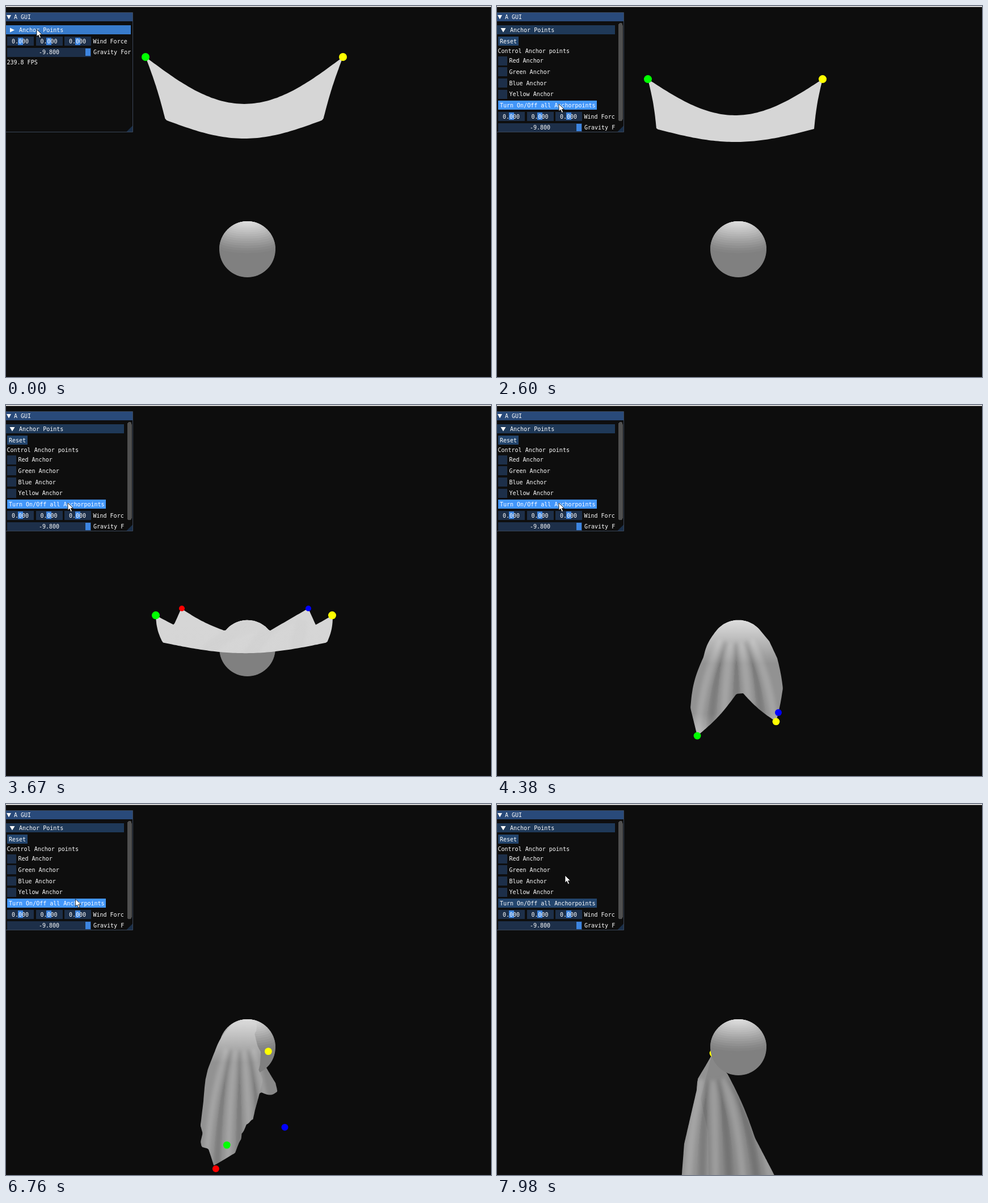
Write an HTML page that moves like this. It is 855 px wide and 655 px high and loops after 8000 ms.

```html
<!DOCTYPE html>
<html lang="en">
<head>
<meta charset="utf-8">
<title>Cloth simulation</title>
<style>
  html, body { margin: 0; width: 100%; height: 100%; overflow: hidden; background: #0d0d0d; }
  svg { display: block; width: 855px; height: 655px; }
  text { font: 10px "DejaVu Sans Mono", monospace; fill: #fff; white-space: pre; }
  #gui rect { shape-rendering: crispEdges; }
</style>
</head>
<body>
<svg id="stage" viewBox="0 0 855 655">
  <defs>
    <linearGradient id="tone" gradientUnits="userSpaceOnUse" x1="0" y1="379" x2="0" y2="600">
      <stop offset="0"/><stop offset=".35"/><stop offset=".75"/><stop offset="1"/>
    </linearGradient>
    <clipPath id="backClip"><path class="back"/></clipPath>
    <clipPath id="frontClip"><path class="front"/></clipPath>
    <clipPath id="ballClip"><circle cx="425.5" cy="429.5" r="49.5"/></clipPath>
    <clipPath id="closedClip"><rect y="27" width="220" height="195"/></clipPath>
    <clipPath id="openClip"><rect y="27" width="208" height="195"/></clipPath>
    <filter id="soft"><feGaussianBlur stdDeviation="3"/></filter>
    <g id="folds" filter="url(#soft)" fill="none"></g>
  </defs>
  <rect width="855" height="655" fill="#0d0d0d"/>
  <rect width="855" height="1.6" fill="#fff"/>
  <path class="back" fill="#888"/>
  <g clip-path="url(#backClip)"><use href="#folds"/></g>
  <g id="under"></g>
  <g id="ball" clip-path="url(#ballClip)"></g>
  <path class="front" fill="url(#tone)"/>
  <g clip-path="url(#frontClip)"><use href="#folds"/></g>
  <g id="over"></g>
  <g id="gui"></g>
  <path id="cursor" d="M0 0V13L3 10.2L5.3 15.5L7.6 14.5L5.3 9.4H9.4Z" fill="#fff" stroke="#000" stroke-width=".8"/>
</svg>
<script>
const LOOP = 8000, OPEN_AT = 500, CLICK_AT = 1967, LAND_AT = 3670;
const BALL = { x: 425.5, y: 429.5, r: 50 };
const $ = id => document.getElementById(id);
const gray = v => `rgb(${[v, v, v].map(Math.round)})`;
const mix = (a, b, u) => a + (b - a) * u;
function smooth(t, from, to) {
  const u = Math.min(1, Math.max(0, (t - from) / (to - from)));
  return u * u * (3 - 2 * u);
}

function el(parent, tag, attrs) {
  const node = document.createElementNS('http://www.w3.org/2000/svg', tag);
  for (const k in attrs) node.setAttribute(k, attrs[k]);
  parent.append(node);
  return node;
}

// ---- Sphere: stacked latitude bands ----
el($('ball'), 'circle', { cx: BALL.x, cy: BALL.y, r: BALL.r, fill: gray(128) });
for (let i = 0; i < 18; i++) {
  const a = Math.PI / 2 * (1 - i / 18), up = Math.cos(a), out = BALL.r * Math.sin(a);
  el($('ball'), 'ellipse', {
    cx: BALL.x, cy: BALL.y - 49 * up, rx: out + .5, ry: out * .2 + 1, fill: gray(128 + 92 * up ** 1.3)
  });
}

// ---- Cloth outlines ----
// A vertex is [x, y, bulge]; the bulge bows the edge to the next vertex outwards.
const SAMPLES = 200;

// Spreads evenly spaced points along the outline so that any two can be blended.
function resample(verts) {
  const pts = [];
  verts.forEach(([x, y, bulge = 0], i) => {
    const [x2, y2] = verts[(i + 1) % verts.length];
    const dx = x2 - x, dy = y2 - y, len = Math.hypot(dx, dy);
    for (let j = 0; j < 24; j++) {
      const u = j / 24, b = bulge * Math.sin(Math.PI * u) / len;
      pts.push([x + dx * u + dy * b, y + dy * u - dx * b]);
    }
  });
  pts.push(pts[0]);
  const along = [0];
  for (let i = 1; i < pts.length; i++) {
    along.push(along[i - 1] + Math.hypot(pts[i][0] - pts[i - 1][0], pts[i][1] - pts[i - 1][1]));
  }
  const out = [];
  for (let i = 0, k = 0; i < SAMPLES; i++) {
    const s = along.at(-1) * i / SAMPLES;
    while (along[k + 1] <= s) k++;
    const u = (s - along[k]) / (along[k + 1] - along[k]);
    out.push(mix(pts[k][0], pts[k + 1][0], u), mix(pts[k][1], pts[k + 1][1], u));
  }
  return out;
}

// Vertices resting on the sphere between two angles in degrees.
function cap(from, to) {
  return Array.from({ length: 9 }, (_, i) => {
    const a = mix(from, to, i / 8) * Math.PI / 180;
    return [BALL.x + BALL.r * Math.cos(a), BALL.y + BALL.r * Math.sin(a)];
  });
}

const poses = [];
const tucked = [[400, 440], [450, 440], [440, 465], [410, 465]];   // rear sheet, hidden by the sphere

// dots: x, y of green, yellow, red, blue
function pose(t, dots, front, back = tucked) {
  poses.push({ t, v: [...resample(front), ...resample(back), ...dots] });
}

// Sheet hanging from two corners: half width and height of both rows, depth of both curves.
function sheet(t, w, y, sag, w2, y2, belly) {
  const l = 420 - w, r = 420 + w, l2 = 420 - w2, r2 = 420 + w2;
  pose(t, [l, y, r, y, l2, y2, r2, y2], [[l, y, -sag], [r, y, -2], [r2, y2, belly], [l2, y2, -2]]);
}

sheet(0, 174, 90, 83, 139, 201, 33);
sheet(CLICK_AT, 174, 90, 83, 139, 201, 33);
sheet(2600, 154, 129, 64, 139, 217, 23);
sheet(3380, 157, 275, 50, 143, 326, 26);
pose(LAND_AT, [264, 371, 575, 371, 310, 359, 533, 359],
  [[264, 371], [296, 388], [309, 359, -3], ...cap(218, 322), [533, 359], [546, 388], [576, 371, 3],
   [566, 419, 19], [276, 419, 3]]);
pose(4200, [304, 578, 536, 574, 315, 560, 530, 555],
  [[304, 578], [297, 540, 4], ...cap(213, 327), [543, 540], [538, 578, 4], [440, 492], [402, 492, 4]]);
pose(4380, [353, 584, 492, 559, 357, 562, 496, 543],
  [[353, 584], [341, 535, 5], [364, 445, 3], ...cap(213, 315), [480, 417], [494, 447, 1], [504, 500, 1],
   [492, 559, 3], [434, 509], [422, 510, 4]]);
pose(5950, [402, 583, 472, 514, 397, 607, 486, 557],
  [[397, 607], [359, 570], [363, 556], [350, 546], [358, 465, 1], ...cap(210, 290), [490, 409],
   [516, 443], [498, 473], [509, 487], [486, 557, -2], [460, 543], [456, 526], [441, 519], [425, 531],
   [428, 541], [413, 568]]);
pose(7420, [380, 637, 450, 392, 350, 690, 501, 592],
  [[335, 660], [337, 629], [328, 626], [349, 492], [376, 418], [379, 400], [397, 388], [412, 382],
   [384, 402], [381, 425], [391, 490], [386, 555], [402, 630], [384, 660]],
  [[380, 440], [466, 455, -3], [501, 592, 6], [466, 592], [455, 585], [437, 592], [428, 608], [400, 632]]);
pose(7980, [385, 730, 381, 440, 350, 790, 520, 700],
  [[325, 665], [330, 600], [352, 505], [354, 485], [378, 445], [359, 520], [372, 580], [373, 665]],
  [[378, 444], [406, 476, 3], [455, 590], [494, 665], [345, 665], [353, 490]]);

// Monotone cubic interpolation between poses.
function poseAt(t) {
  let k = 0;
  while (k < poses.length - 2 && t >= poses[k + 1].t) k++;
  const a = poses[k], b = poses[k + 1], h = b.t - a.t, u = Math.min(1, (t - a.t) / h), w = 1 - u;
  const slope = (j, i) => (poses[j + 1].v[i] - poses[j].v[i]) / (poses[j + 1].t - poses[j].t);
  const tangent = (p, q) => p * q > 0 ? 2 * p * q / (p + q) : 0;
  return a.v.map((y, i) => {
    const s = slope(k, i);
    const m = k ? tangent(slope(k - 1, i), s) : s;
    const n = k < poses.length - 2 ? tangent(s, slope(k + 1, i)) : s;
    return y * (1 + 2 * u) * w * w + b.v[i] * u * u * (3 - 2 * u) + h * (m * u * w * w - n * u * u * w);
  });
}

const polygon = p => 'M' + p.map(v => v.toFixed(1)).join(' ') + 'Z';
const setAll = (cls, d) => document.querySelectorAll(cls).forEach(n => n.setAttribute('d', d));
const show = (n, on) => n.setAttribute('visibility', on ? 'visible' : 'hidden');

const FOLDS = 7;
const folds = Array.from({ length: FOLDS }, (_, i) => el($('folds'), 'path', {
  stroke: i % 2 ? '#000' : '#fff', 'stroke-opacity': i % 2 ? .15 : .17,
  pathLength: 100, 'stroke-dasharray': '0 20 80'
}));
const dots = ['#0f0', '#ff0', '#f00', '#00f'].map(fill => el($('over'), 'circle', { fill }));
$('over').append(dots[2], dots[3], dots[0], dots[1]);
const stops = document.querySelectorAll('#tone stop');

// Soft creases fan out from the highest point of the cloth to its hem.
function drawFolds(pts, t) {
  const xs = pts.filter((_, i) => i % 2 === 0), ys = pts.filter((_, i) => i % 2);
  const left = Math.min(...xs), right = Math.max(...xs), top = Math.min(...ys), low = Math.max(...ys);
  const apex = xs[ys.indexOf(top)];
  folds.forEach((n, i) => {
    const x = mix(left, right, (i + .5) / FOLDS);
    n.setAttribute('d', `M${apex} ${top}Q${mix(apex, x, .8)} ${mix(top, low, .3)} ${x} ${low}`);
    n.setAttribute('stroke-width', (right - left) / FOLDS * .55);
  });
  $('folds').setAttribute('opacity', smooth(t, 3500, 4400));
}

function drawCloth(t) {
  const v = poseAt(t), size = SAMPLES * 2;
  const front = v.slice(0, size), back = v.slice(size, 2 * size), spots = v.slice(2 * size);
  setAll('.front', polygon(front));
  setAll('.back', polygon(back));
  drawFolds([...front, ...back], t);

  const drape = smooth(t, LAND_AT, 4380), body = mix(213, 146, drape);
  const tip = body + 50 * drape * (1 - smooth(t, 4500, 5900));
  [mix(214, 222, drape), body, body, tip].forEach((g, i) => stops[i].setAttribute('stop-color', gray(g)));

  dots.forEach((n, i) => {
    n.setAttribute('cx', spots[i * 2]);
    n.setAttribute('cy', spots[i * 2 + 1]);
    n.setAttribute('r', i < 2 ? mix(7, 6.4, drape) : mix(5, 6, drape));
  });
  show(dots[2], t > 3400 && (t < 4000 || t > 5300));
  show(dots[3], t > 3400);
  (t > 7500 ? $('under') : $('over')).append(dots[1]);
}

// ---- Control panel ----
const C = {
  frame: '#1d2f49', grab: '#3d85e0', button: '#23456d', hot: '#4296fa', down: '#0f87fa',
  header: '#1f3958', headerHot: '#387bcb', edge: '#3a4658'
};
const ROW = 19.6;
const gui = $('gui');
const box = (g, x, y, width, height, fill) => el(g, 'rect', { x, y: Math.round(y), width, height, fill });
const shape = (g, d, fill = '#fff') => el(g, 'path', { d, fill });
function label(g, x, mid, str) {
  el(g, 'text', { x, y: Math.round(mid + 3.6) }).textContent = str;
}

function sliders(g, y) {
  for (let i = 0; i < 3; i++) {
    const x = 2 + i * 50.5;
    box(g, x, y, 47, 16, C.frame);
    box(g, x + 18.5, y + 1.5, 9, 13, C.grab);
    label(g, x + 8, y + 8, '0.000');
  }
  label(g, 153.5, y + 8, 'Wind Force');
  box(g, 2, y + ROW, 148, 16, C.frame);
  box(g, 140, y + ROW + 1.5, 9, 13, C.grab);
  label(g, 58, y + ROW + 8, '-9.800');
  label(g, 154, y + ROW + 8, 'Gravity Force');
}

box(gui, 0, 12, 224, 210, '#0e0e0e');
box(gui, 0, 12, 223, 15, '#294a7a');
shape(gui, 'M1 16H9L5 23.5Z');
label(gui, 14, 19.7, 'A GUI');

const closed = el(gui, 'g', { 'clip-path': 'url(#closedClip)' });
const closedHead = box(closed, 0, 34, 221, 16, C.headerHot);
shape(closed, 'M7 38.5L15 42.5L7 46.5Z');
label(closed, 23, 42.5, 'Anchor Points');
sliders(closed, 54.2);
label(closed, 1.5, 99, '239.8 FPS');

const open = el(gui, 'g', {});
const list = el(el(open, 'g', { 'clip-path': 'url(#openClip)' }), 'g', {});
const openHead = box(list, 0, 34, 209, 16, C.header);
shape(list, 'M6.5 39H15.5L11 46.5Z');
label(list, 23, 42.5, 'Anchor Points');
box(list, 2, 54, 36, 16, C.button);
label(list, 5, 62.3, 'Reset');
label(list, 1.5, 79.3, 'Control Anchor points');
['Red', 'Green', 'Blue', 'Yellow'].forEach((name, i) => {
  box(list, 2, 88.8 + i * ROW, 16, 16, C.frame);
  label(list, 21.5, 96.8 + i * ROW, name + ' Anchor');
});
const toggle = box(list, 2, 167, 174, 16, C.button);
label(list, 5, 175.2, 'Turn On/Off all Anchorpoints');
sliders(list, 186.9);
label(list, 1.5, 231.3, '239.9 FPS');
const bar = el(open, 'rect', { x: 214, y: 30, width: 7.5, height: 173, rx: 3.5, fill: '#4f4f4f' });

shape(gui, 'M223 211.5V222H212.5Z', '#1a2f49');
el(gui, 'path', { d: 'M0 11.5H223.5V222.5H0', fill: 'none', stroke: C.edge });

// time, x, y
const mouse = [[0, 54, 41], [950, 54, 41], [1650, 109, 173], [6600, 109, 173],
  [7150, 174, 148], [7550, 174, 148], [7900, 120, 126], [LOOP, 120, 126]];

function mouseAt(t) {
  let k = 0;
  while (t >= mouse[k + 1][0]) k++;
  const [t0, x0, y0] = mouse[k], [t1, x1, y1] = mouse[k + 1], u = smooth(t, t0, t1);
  return [mix(x0, x1, u), mix(y0, y1, u)];
}

function drawGui(t) {
  const [x, y] = mouseAt(t);
  const isOpen = t >= OPEN_AT, scroll = t >= 7100 && t < 7700 ? 20 : 0;
  const inside = (top, right) => x < right && y >= top - scroll && y < top + 16 - scroll;
  closed.setAttribute('display', isOpen ? 'none' : 'inline');
  open.setAttribute('display', isOpen ? 'inline' : 'none');
  list.setAttribute('transform', `translate(0 ${-scroll})`);
  bar.setAttribute('y', scroll ? 48 : 30);
  const head = inside(34, 208) ? C.headerHot : C.header;
  openHead.setAttribute('fill', head);
  closedHead.setAttribute('fill', head);
  const pressed = t > CLICK_AT - 90 && t < CLICK_AT;
  toggle.setAttribute('fill', pressed ? C.down : inside(167, 176) ? C.hot : C.button);
  $('cursor').setAttribute('transform', `translate(${x} ${y})`);
}

function frame() {
  const t = performance.now() % LOOP;
  drawCloth(t);
  drawGui(t);
  requestAnimationFrame(frame);
}
frame();
</script>
</body>
</html>
```
